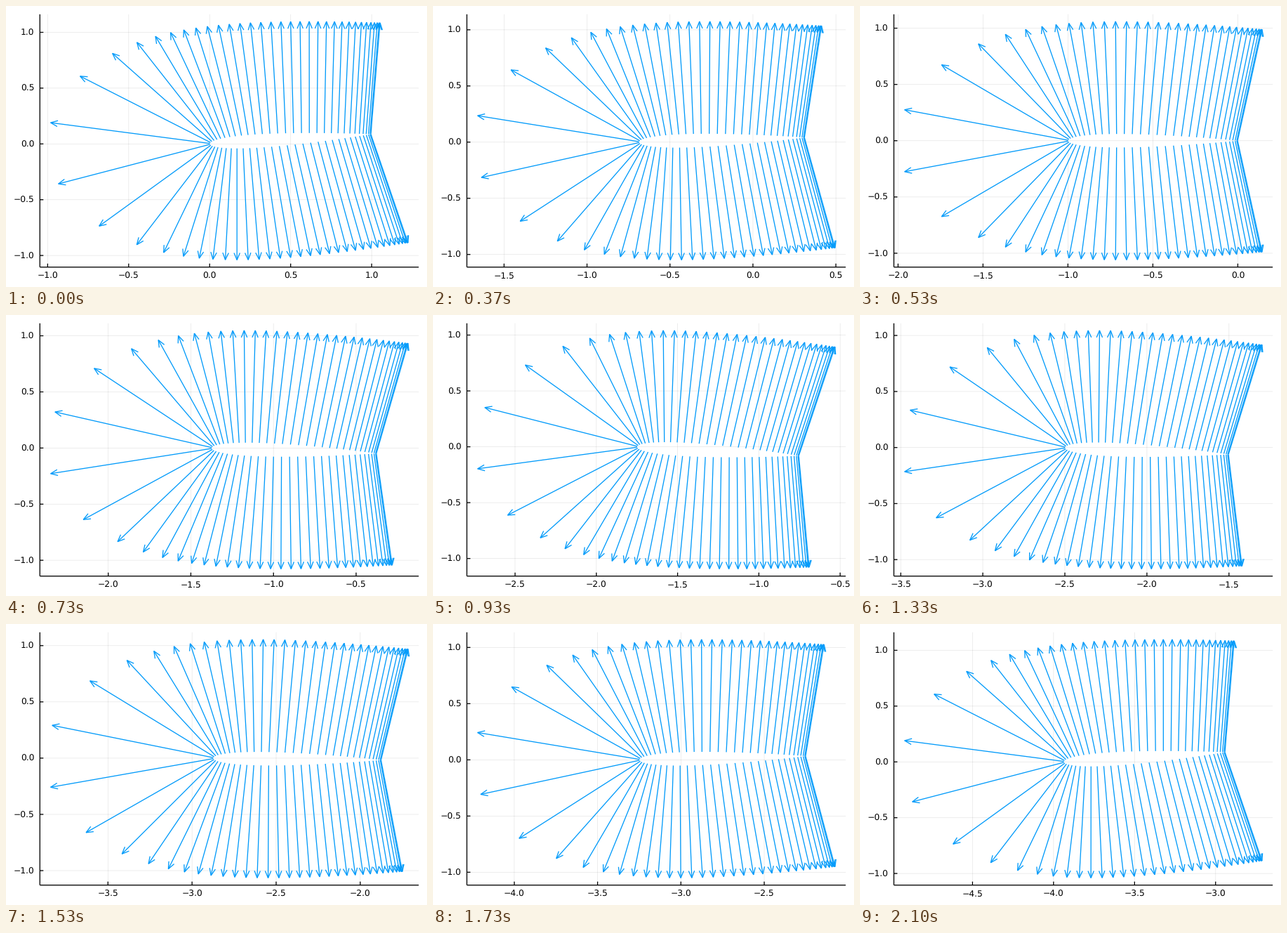
Write a matplotlib script that moves like this. It is 600 by 400 pixels and loops after 2130 ms.

```python
import numpy as np
import matplotlib as mpl
import matplotlib.pyplot as plt
from matplotlib.animation import FuncAnimation
from matplotlib.collections import LineCollection

mpl.rcParams["text.hinting"] = "none"
mpl.rcParams["font.family"] = "DejaVu Sans"

W, H, DPI = 600, 400, 100
LEFT, RIGHT, TOP, BOTTOM = 48.3, 588.2, 11.8, 371.7
STEPS = 64            # poses per pitching period
TICKS = 213           # 10 ms ticks per loop
PITCH = np.radians(5)
PANELS = 32           # per side
HEAD, HALF = 10, 4.2  # arrowhead length and half width
BLUE = "#009AFA"
PT = 72 / DPI


def foil():
    """NACA 0012 panel midpoints and outward unit normals."""
    x = (1 - np.cos(np.linspace(0, np.pi, PANELS + 1))) / 2
    y = 0.6 * (0.2969 * np.sqrt(x) - 0.126 * x - 0.3516 * x**2
               + 0.2843 * x**3 - 0.1036 * x**4)
    upper = np.column_stack([x, y])
    mid = (upper[1:] + upper[:-1]) / 2
    d = np.diff(upper, axis=0)
    normal = np.column_stack([-d[:, 1], d[:, 0]])
    normal /= np.linalg.norm(normal, axis=1, keepdims=True)
    flip = np.array([1, -1])
    return np.vstack([mid, mid * flip]), np.vstack([normal, normal * flip])


MID, NORMAL = foil()


def arrows(k):
    """Tails and tips of the normals at pose k."""
    a = PITCH * np.cos(2 * np.pi * k / STEPS)
    rot = np.array([[np.cos(a), np.sin(a)], [-np.sin(a), np.cos(a)]])
    tail = MID @ rot + [-k / 16, 0]
    return tail, tail + NORMAL @ rot


def half_steps(lo, hi):
    return np.arange(np.ceil(lo * 2), np.floor(hi * 2) + 1) / 2


def label(v):
    return ("−" if v < 0 else "") + f"{abs(v):.1f}"


fig = plt.figure(figsize=(W / DPI, H / DPI), dpi=DPI, facecolor="white")
ax = fig.add_axes([0, 0, 1, 1])
ax.set(xlim=(0, W), ylim=(H, 0))
ax.axis("off")


def lines(color, width, z, **kw):
    return ax.add_collection(LineCollection(
        [], colors=color, linewidths=width * PT, zorder=z, snap=False, **kw),
        autolim=False)


grid = lines("black", 0.7, 1, alpha=0.1)
frame = lines("black", 1.3, 2)
shafts = lines(BLUE, 1.3, 3)
heads = lines(BLUE, 1.3, 3, joinstyle="miter")
style = dict(fontsize=12.2 * PT, va="baseline")
x_text = [ax.text(0, 387.8, "", ha="center", **style) for _ in range(6)]
y_text = [ax.text(40.2, 0, "", ha="right", **style) for _ in range(6)]


def set_labels(texts, values, place):
    for t in texts:
        t.set_text("")
    for t, v in zip(texts, values):
        t.set_text(label(v))
        place(t, v)


def draw(n):
    tail, tip = arrows(int(0.3 * n + 0.15))
    pts = np.vstack([tail, tip])
    lo, hi = pts.min(axis=0), pts.max(axis=0)
    pad = 0.03 * (hi - lo)
    lo, hi = lo - pad, hi + pad

    def px(x):
        return LEFT + (x - lo[0]) / (hi[0] - lo[0]) * (RIGHT - LEFT)

    def py(y):
        return BOTTOM - (y - lo[1]) / (hi[1] - lo[1]) * (BOTTOM - TOP)

    def to_px(p):
        return np.column_stack([px(p[:, 0]), py(p[:, 1])])

    a, b = to_px(tail), to_px(tip)
    u = (b - a) / np.linalg.norm(b - a, axis=1, keepdims=True)
    side = HALF * np.column_stack([-u[:, 1], u[:, 0]])
    base = b - HEAD * u
    shafts.set_segments(np.stack([a, b], axis=1))
    heads.set_segments(np.stack([base + side, b, base - side], axis=1))

    xs, ys = half_steps(lo[0], hi[0]), half_steps(lo[1], hi[1])
    grid.set_segments([[(px(x), TOP), (px(x), BOTTOM)] for x in xs]
                      + [[(LEFT, py(y)), (RIGHT, py(y))] for y in ys])
    frame.set_segments([[(LEFT, TOP), (LEFT, BOTTOM)],
                        [(LEFT, BOTTOM), (RIGHT, BOTTOM)]]
                       + [[(px(x), BOTTOM), (px(x), BOTTOM - 5)] for x in xs]
                       + [[(LEFT, py(y)), (LEFT + 5, py(y))] for y in ys])
    set_labels(x_text, xs, lambda t, v: t.set_x(px(v)))
    set_labels(y_text, ys, lambda t, v: t.set_y(py(v) + 4.4))
    return [grid, frame, shafts, heads, *x_text, *y_text]


anim = FuncAnimation(fig, draw, frames=TICKS, interval=10, repeat=True,
                     repeat_delay=0, init_func=lambda: draw(0))
plt.show()
```
